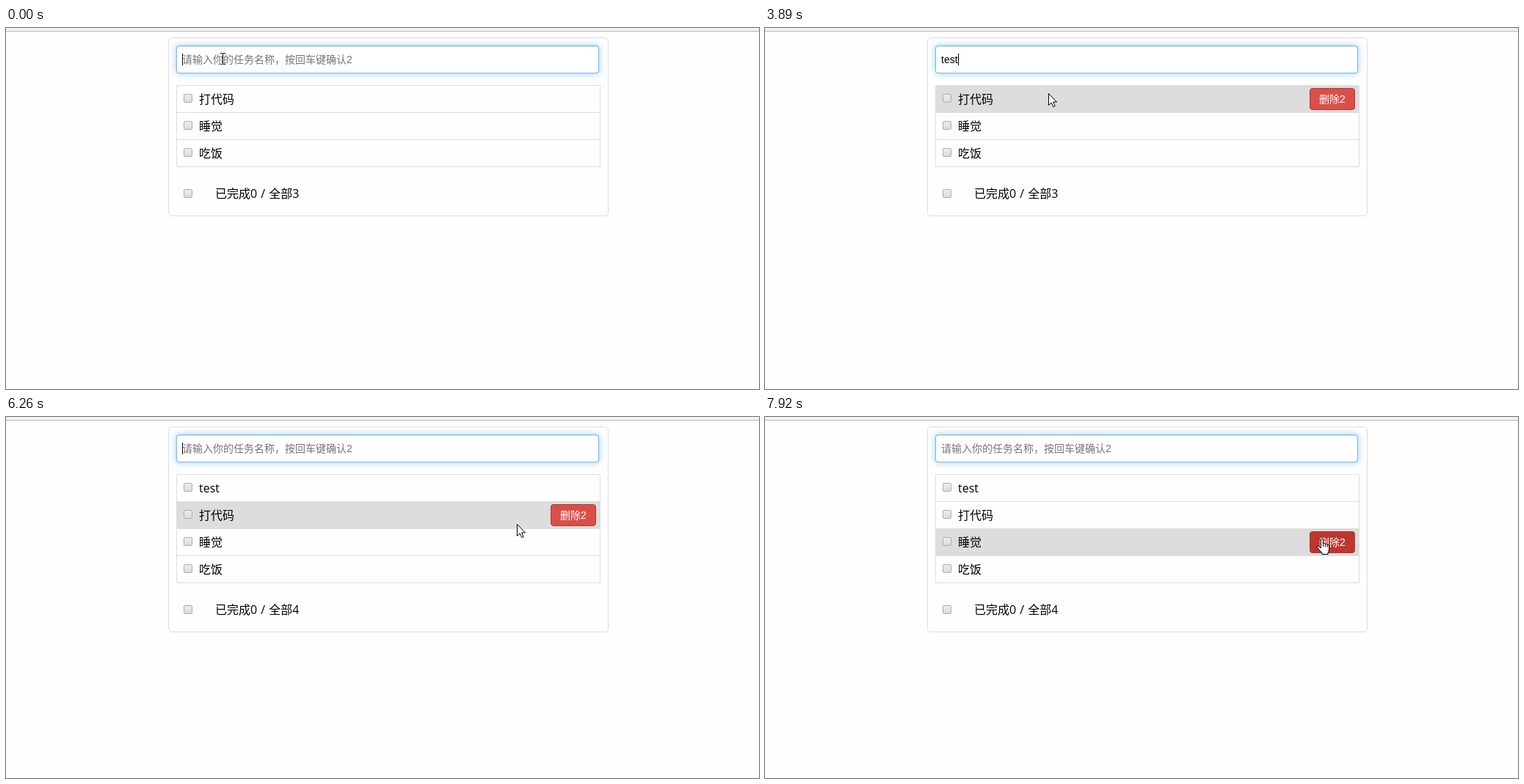
These frames come from a looping animation (1026x493 px, 8000 ms). An HTML page:

```html
<!DOCTYPE html>
<html lang="zh-CN">
<head>
<meta charset="utf-8">
<title>任务列表</title>
<style>
  html, body { margin: 0; width: 100%; height: 100%; overflow: hidden; background: #fefefe; }
  div, #stage { position: absolute; box-sizing: border-box; }
  #bar { left: 0; top: 0; width: 100%; height: 5px; background: #f2f2f2; border-bottom: 1px solid #b8b8b8; }
  #panel { left: 221px; top: 13px; width: 600px; border: 1px solid #ddd; border-radius: 5px; }
  #field { left: 232px; top: 24px; width: 576px; height: 38px; background: #fff; border: 1px solid rgba(82,168,236,.8);
    border-radius: 4px; box-shadow: inset 0 1px 1px rgba(0,0,0,.075), 0 0 8px rgba(82,168,236,.6); }
  #list { left: 232px; top: 78px; width: 578px; border: 1px solid #ddd; border-radius: 2px; }
  #stage { left: 0; top: 0; }
  text { font: 16px "Open Sans", "Noto Sans CJK SC", "Noto Sans CJK", sans-serif; fill: #000; white-space: pre; }
  .small { font: 14px "Liberation Sans", "Noto Sans CJK SC", "Noto Sans CJK", sans-serif; }
  .hint { fill: #757575; }
  .btn { fill: #fff; }
  .typed { font: bold 16px "Liberation Sans", sans-serif; fill: #3d4653; }
  .cand { font: 16px "Liberation Serif", "Noto Sans CJK SC", "Noto Sans CJK", serif; fill: #464d58; }
  .first { fill: #f00; }
  #total { word-spacing: 1px; }
</style>
</head>
<body>
<div id="bar"></div>
<div id="panel"></div>
<div id="field"></div>
<div id="list"></div>
<svg id="stage" width="1026" height="493" viewBox="0 0 1026 493">
  <defs>
    <linearGradient id="box" x2="0" y2="1"><stop stop-color="#eee"/><stop offset="1" stop-color="#dadada"/></linearGradient>
  </defs>
  <text id="hint" class="small hint" x="240" y="48">请输入你的任务名称，按回车键确认2</text>
  <text id="value" class="small" x="240" y="48"></text>
  <rect id="under" x="241" y="49" width="3" height="1"/>
  <rect id="caret" y="35" width="1" height="16"/>
  <g id="rows"></g>
  <g id="button">
    <rect x="742.5" y="3.5" width="61" height="29" rx="3.5" stroke="#bd362f"/>
    <text class="small btn" x="755" y="23">删除2</text>
  </g>
  <g id="foot">
    <rect x="242.5" y="14.5" width="11" height="11" rx="1.5" fill="url(#box)" stroke="#adadad"/>
    <text id="total" x="285" y="26"></text>
  </g>
  <g id="ime">
    <rect id="frame" x="244.5" y="51.5" height="55" fill="#fafdff" stroke="#b3cad6"/>
    <text id="typed" class="typed" x="254" y="71"></text>
    <rect id="mark" y="56" width="1" height="19" fill="#f00"/>
    <g id="cands"></g>
    <g id="tail">
      <path d="M-51 87v10l-6 -5z" fill="#d3e2ec"/>
      <path d="M-42 87v10l6 -5z" fill="#343b48"/>
      <rect x="-30" y="53" width="28" height="27" fill="#b7e1b0"/>
    </g>
  </g>
  <g id="pointer">
    <path id="beam" d="M-3 -7.5h2.5M.5 -7.5H4M-3 7.5h2.5M.5 7.5H4M.5 -7V7" fill="none" stroke="#000"/>
    <path id="arrow" d="M.5 .5V16.5L4.2 13L6.8 18.7L9.2 17.7L6.7 12H11.5Z" fill="#fff" stroke="#000"/>
    <path id="hand" d="M.5 13V1.8Q.6 .5 2 .5T3.5 1.8V7Q5 5.6 6.3 7.6Q8 6.4 9.1 8.4Q11.6 7.6 11.6 10.5V15Q11.5 17.5 10 19.2V21.5H2V19.5L-4.5 12.7Q-5.3 10.3 -2.7 10.5L.5 13ZM3.5 7V11M6.4 8V11.5M9.1 8.5V12" fill="#fff" stroke="#000"/>
  </g>
</svg>
<script>
const LOOP = 8000, ROW = 37, TOP = 79;
const $ = id => document.getElementById(id);
const show = (id, on) => $(id).setAttribute('display', on ? 'inline' : 'none');
const move = (id, x, y) => $(id).setAttribute('transform', `translate(${x} ${y})`);
const size = (id, name, v) => $(id).setAttribute(name, v);

const before = ['打代码', '睡觉', '吃饭'];
const after = ['test', ...before];
const words = {
  t: [632, '和', '生活i', '我们w', '自己n', '特点h'],
  te: [720, '秀', '透明度y', '盘根错节q', '航天飞机t', '舱位w'],
  tes: [632, '舸', '透顶d', '般配g', '透析r', '盘查j'],
};
const typedEnd = { t: 260, te: 269, tes: 278 };

// Each step keeps whatever it does not mention.
const steps = [
  [0, { items: before, value: '', ime: '', caret: 240, hover: -1, hot: false, shape: 'beam', at: [295, 42] }],
  [430, { caret: 0 }],
  [960, { caret: 240 }],
  [1490, { caret: 0 }],
  [2020, { caret: 240 }],
  [2320, { ime: 't', caret: 244 }],
  [2450, { ime: 'te' }],
  [2720, { ime: 'tes' }],
  [3190, { ime: '', value: 'tes', caret: 258 }],
  [3620, { value: 'test', caret: 263 }],
  [3890, { shape: 'arrow', at: [386, 89], hover: 0 }],
  [4010, { at: [470, 85] }],
  [4130, { at: [517, 81], caret: 0 }],
  [4570, { caret: 263 }],
  [5000, { items: after, value: '', caret: 240 }],
  [5590, { at: [512, 74], caret: 0 }],
  [5740, { at: [560, 68], hover: -1 }],
  [5860, { at: [640, 95], hover: 0 }],
  [5980, { at: [688, 117], caret: 240 }],
  [6130, { at: [694, 132], hover: 1 }],
  [6260, { at: [696, 146] }],
  [6400, { at: [698, 159] }],
  [6520, { at: [699, 175], hover: 2, caret: 0 }],
  [6640, { at: [700, 191] }],
  [6800, { at: [702, 206], hover: 3 }],
  [6950, { at: [704, 213] }],
  [7070, { at: [705, 217], caret: 240 }],
  [7220, { at: [705, 221] }],
  [7500, { at: [718, 210], caret: 0 }],
  [7650, { at: [738, 185], hover: 2 }],
  [7800, { at: [760, 170], shape: 'hand', hot: true }],
  [7920, { at: [757, 166] }],
];

function drawRows(s) {
  const n = s.items.length;
  $('rows').innerHTML = s.items.map((name, i) => {
    const y = TOP + i * ROW;
    const fill = i === s.hover ? `<rect x="233" y="${y}" width="576" height="36" fill="#ddd"/>` : '';
    const line = i < n - 1 ? `<rect x="233" y="${y + 36}" width="576" height="1" fill="#ddd"/>` : '';
    return `${fill}${line}<rect x="242.5" y="${y + 11.5}" width="11" height="11" rx="1.5" fill="url(#box)" stroke="#adadad"/>
      <text x="263" y="${y + 24}">${name}</text>`;
  }).join('');
  $('list').style.height = n * ROW + 1 + 'px';
  $('panel').style.height = n * ROW + 133 + 'px';
  $('total').textContent = `已完成0 / 全部${n}`;
  move('foot', 0, TOP + n * ROW + 16);
}

function drawIme(key) {
  show('ime', key);
  show('under', key);
  if (!key) return;
  const [right, ...list] = words[key];
  let x = 255;
  $('typed').textContent = key;
  size('mark', 'x', typedEnd[key]);
  size('frame', 'width', right - 245);
  move('tail', right, 0);
  $('cands').innerHTML = list.map((word, i) => {
    const xs = [x, x + 9];
    x += 16;
    for (const c of word) {
      xs.push(x);
      x += c > '~' ? 16 : 8;
    }
    x += 12;
    return `<text class="cand ${i ? '' : 'first'}" x="${xs.join(' ')}" y="98">${i + 1}.${word}</text>`;
  }).join('');
}

function draw(s) {
  drawRows(s);
  drawIme(s.ime);
  show('hint', !s.value && !s.ime);
  $('value').textContent = s.value;
  show('caret', s.caret);
  size('caret', 'x', s.caret);
  show('button', s.hover >= 0);
  move('button', 0, TOP + s.hover * ROW);
  size('button', 'fill', s.hot ? '#bd362f' : '#da4f49');
  for (const id of ['beam', 'arrow', 'hand']) show(id, id === s.shape);
  move('pointer', ...s.at);
}

const states = [];
steps.reduce((s, [, change]) => {
  const next = { ...s, ...change };
  states.push(next);
  return next;
}, {});

const start = performance.now();
let last = -1;
function tick() {
  const t = (performance.now() - start) % LOOP;
  let i = steps.length - 1;
  while (steps[i][0] > t) i--;
  if (i !== last) draw(states[last = i]);
  requestAnimationFrame(tick);
}
tick();
</script>
</body>
</html>
```
